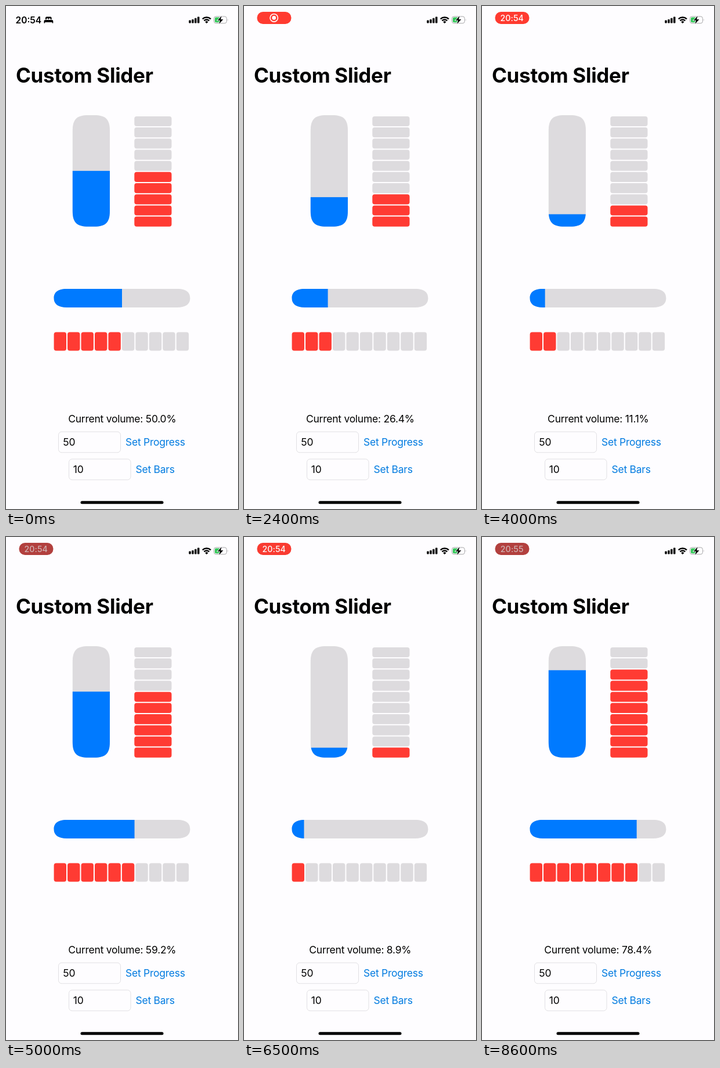
Animation, 400 px wide and 866 px high, one loop 8.7 s. Source, as an HTML page:

```html
<!DOCTYPE html>
<html lang="en">
<head>
<meta charset="utf-8">
<title>Custom Slider</title>
<style>
  html, body { margin: 0; width: 100%; height: 100%; overflow: hidden; background: #fefdff; }
  svg { display: block; width: 100%; height: 100%; }
  text { font-family: Inter, "Liberation Sans", sans-serif; font-size: 17.5px; letter-spacing: -.25px; }
  .title { font-size: 35px; font-weight: 700; letter-spacing: -.3px; }
  .clock { font-size: 15.5px; font-weight: 600; letter-spacing: 0; }
  .pill { font-size: 14.2px; font-weight: 500; letter-spacing: .1px; }
  .link { fill: #007be0; }
  .field { fill: #fefdff; stroke: #e1e0e3; }
  .track { fill: #dddbde; }
  .fill { fill: #007aff; }
</style>
</head>
<body>
<svg viewBox="0 0 400 866">
  <defs>
    <clipPath id="tall"><path id="tallShape"/></clipPath>
    <clipPath id="wide"><path id="wideShape"/></clipPath>
  </defs>
  <rect width="400" height="866" fill="#fefdff"/>

  <g id="idle">
    <text class="clock" x="16.5" y="29.5" textLength="">20:54</text>
    <path d="M68 23.2V20.4Q68 18.4 70 18.4H76.600Q78.600 18.4 78.600 20.4V23.2H76.800V22.300Q76.800 21.300 75.800 21.300H74.800Q73.800 21.300 73.800 22.300V23.200H72.800V22.300Q72.800 21.300 71.800 21.300H70.800Q69.800 21.300 69.800 22.300V23.200Z
      M67.500 23.900H79.200Q81.300 23.900 81.300 26V29.600H79.600V28H67.200V29.600H65.500V26Q65.500 23.900 67.500 23.900Z"/>
  </g>
  <g id="rec">
    <rect id="pill" x="22.500" y="10" width="59" height="21" rx="10.200"/>
    <g id="dot" fill="none" stroke="#fff" stroke-width="1.600">
      <circle cx="51.700" cy="20.400" r="6.700"/>
      <circle cx="51.700" cy="20.400" r="3.300" fill="#fff" stroke="none"/>
    </g>
    <text id="pillTime" class="pill" x="51.700" y="25.600" text-anchor="middle"></text>
  </g>

  <g id="signal"></g>
  <g fill="none" stroke="#000" stroke-width="2.500">
    <path d="M338.800 22.300A10.500 10.500 0 0 1 353 22.300"/>
    <path d="M341.500 25.300A6.400 6.400 0 0 1 350.300 25.300"/>
    <path d="M345.900 30L343.300 27.400A3.700 3.700 0 0 1 348.500 27.400Z" fill="#000" stroke="none"/>
  </g>
  <rect x="358.500" y="18" width="22" height="11.800" rx="3.600" fill="none" stroke="#a7a6a9"/>
  <path d="M382 22.200Q383.500 23.900 382 25.600Z" fill="#a7a6a9"/>
  <path d="M368.500 19.600H362Q360 19.600 360 21.600V26.200Q360 28.200 362 28.200H368.500Z" fill="#34c759"/>
  <path d="M371.800 17L364.800 24.800H369L367.300 31L374.500 22.900H370.200Z" stroke="#fefdff" stroke-width="1.600" paint-order="stroke"/>

  <text class="title" x="17" y="132">Custom Slider</text>

  <g clip-path="url(#tall)">
    <rect class="track" x="114" y="187" width="66" height="194"/>
    <rect id="tallFill" class="fill" x="114" width="66"/>
  </g>
  <g id="rows"></g>
  <g clip-path="url(#wide)">
    <rect class="track" x="82" y="486" width="237" height="34"/>
    <rect id="wideFill" class="fill" x="82" y="486" height="34"/>
  </g>
  <g id="cols"></g>

  <text id="volume" x="200.300" y="717" text-anchor="middle"></text>
  <rect class="field" x="90.500" y="733" width="107" height="35.800" rx="5.500"/>
  <text x="98.300" y="757">50</text>
  <text class="link" x="206" y="757">Set Progress</text>
  <rect class="field" x="108.500" y="780" width="106.500" height="35.800" rx="5.500"/>
  <text x="115.800" y="804">10</text>
  <text class="link" x="223.500" y="804">Set Bars</text>
  <rect x="128.500" y="852.200" width="143" height="5" rx="2.500"/>
</svg>
<script>
const $ = id => document.getElementById(id);
const LOOP = 8700, STEP = 100;
// [time, volume]
const drag = [[0, 50], [400, 50], [1200, 60.8], [2400, 26.4], [4000, 11.1],
              [5700, 86.6], [6500, 8.9], [8600, 78.4], [8700, 78.4]];

function addRect(parent, x, y, width, height, rx) {
  const r = document.createElementNS("http://www.w3.org/2000/svg", "rect");
  const attrs = { x, y, width, height, rx };
  for (const k in attrs) r.setAttribute(k, attrs[k]);
  return parent.appendChild(r);
}

// Rounded box with smooth corners: a, b are corner extents, p, q handle offsets
function smoothBox(x, y, w, h, a, b, p, q) {
  const r = x + w, d = y + h;
  return `M${x + a} ${y}H${r - a}C${r - p} ${y} ${r} ${y + q} ${r} ${y + b}V${d - b}` +
    `C${r} ${d - q} ${r - p} ${d} ${r - a} ${d}H${x + a}` +
    `C${x + p} ${d} ${x} ${d - q} ${x} ${d - b}V${y + b}C${x} ${y + q} ${x + p} ${y} ${x + a} ${y}Z`;
}

$("tallShape").setAttribute("d", smoothBox(114.8, 187.9, 64.2, 191.9, 27, 27, 7, 7));
$("wideShape").setAttribute("d", smoothBox(82.6, 487, 234.8, 31.9, 22, 16, 5.2, 7.2));

const rows = [], cols = [];
for (let i = 0; i < 10; i++) {
  rows.push(addRect($("rows"), 221.3, 362.6 - i * 19.19, 64.2, 17.2, 4));
  cols.push(addRect($("cols"), 82.6 + i * 23.46, 561.5, 21.4, 32, 4));
}
[5, 6.6, 8.8, 11].forEach((h, i) => addRect($("signal"), 315.3 + i * 4.9, 29.6 - h, 3.5, h, 1));

function volumeAt(t) {
  const i = drag.findIndex(k => k[0] > t);
  const [t0, v0] = drag[i - 1], [t1, v1] = drag[i];
  return v0 + (v1 - v0) * (1 - Math.cos(Math.PI * (t - t0) / (t1 - t0))) / 2;
}

const mix = (a, b, k) => `rgb(${a.map((v, i) => Math.round(v + (b[i] - v) * k))})`;
const show = (id, on) => $(id).setAttribute("visibility", on ? "visible" : "hidden");

function drawStatus(t) {
  const recording = t >= 500, clock = t >= 3200;
  const dim = Math.cos(Math.PI * (t - 8600) / 1800) ** 18;
  show("idle", !recording);
  show("pill", recording);
  show("dot", recording && !clock);
  show("pillTime", recording && clock);
  $("pill").setAttribute("fill", mix([255, 59, 48], [178, 64, 62], dim));
  $("pillTime").setAttribute("fill", mix([255, 255, 255], [208, 176, 176], dim));
  $("pillTime").textContent = t >= 8500 ? "20:55" : "20:54";
}

function draw(t) {
  const v = volumeAt(t), lit = Math.ceil(v / 10);
  const top = 379.8 - 1.919 * v;
  $("tallFill").setAttribute("y", top);
  $("tallFill").setAttribute("height", 381 - top);
  $("wideFill").setAttribute("width", .6 + 2.348 * v);
  for (const set of [rows, cols])
    set.forEach((r, i) => r.setAttribute("fill", i < lit ? "#ff3b33" : "#dddbde"));
  $("volume").textContent = `Current volume: ${v.toFixed(1)}%`;
  drawStatus(t);
}

const start = performance.now();
function tick() {
  const t = (performance.now() - start) % LOOP;
  draw(Math.floor(t / STEP) * STEP);
  requestAnimationFrame(tick);
}
tick();
</script>
</body>
</html>
```
